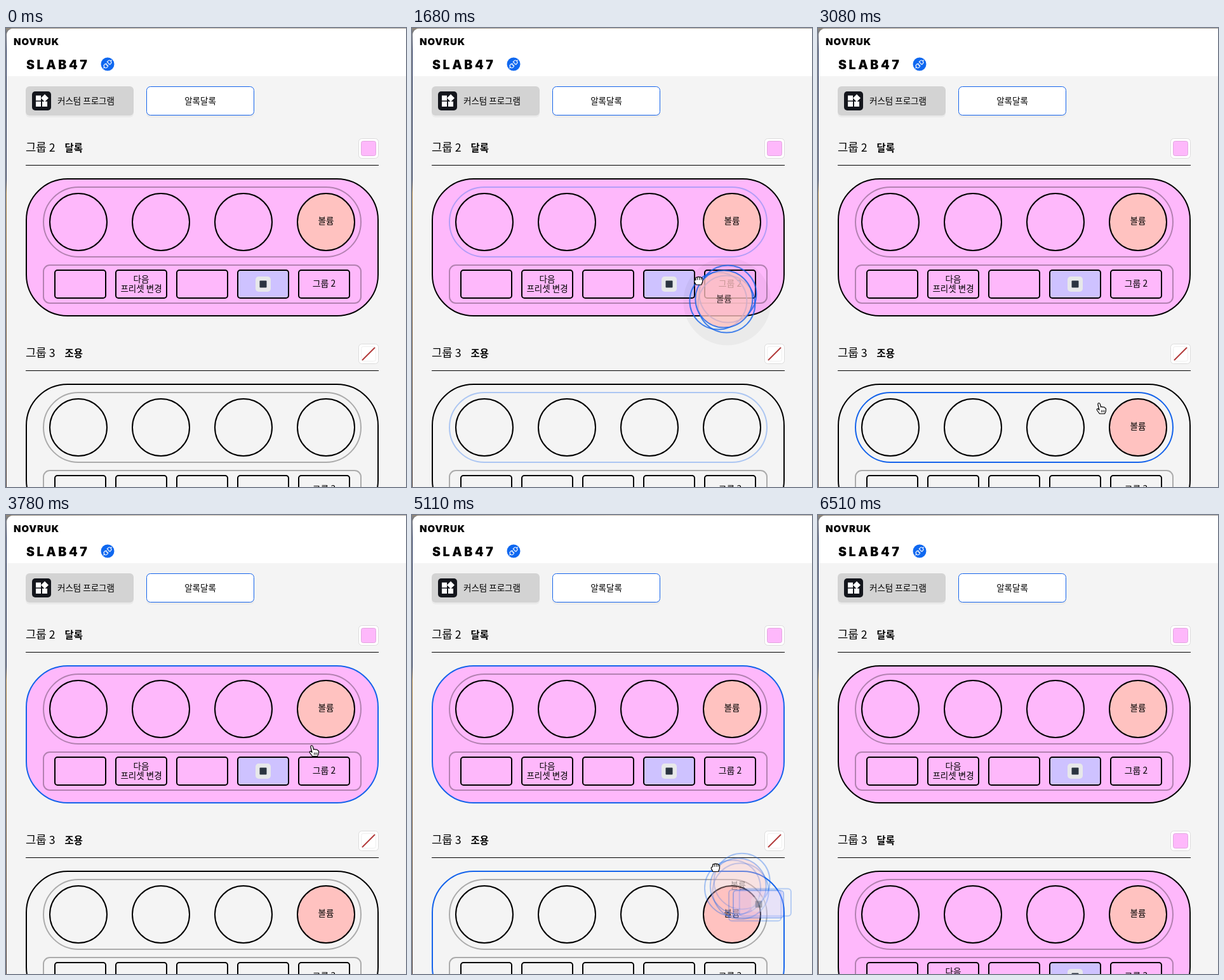
An HTML page with a canvas that plays this animation: 630x724 px, repeating every 6.86 s.

```html
<!DOCTYPE html>
<html lang="ko">
<head>
<meta charset="utf-8">
<style>
html, body { margin: 0; width: 100%; height: 100%; overflow: hidden; }
canvas { display: block; }
</style>
</head>
<body>
<canvas id="stage" width="630" height="724"></canvas>
<script>
const ctx = document.getElementById('stage').getContext('2d');
const LOOP = 6860, STEP = 70;
const BLUE = '#1463eb', PALE = 'rgba(20,99,235,.32)', GREY = 'rgba(0,0,0,.3)';
const PINK = '#feb8fb', PEACH = '#ffc2c0', LILAC = '#cec2ff', PAGE = '#f4f4f4';
const HANGUL = '"Noto Sans CJK KR", "Noto Sans CJK JP", "Noto Sans CJK SC", sans-serif';

// Keys: time, then any number of values
const CURSOR = [
  [70, 560, 740], [490, 500, 318], [770, 500, 318], [1050, 461, 338], [1400, 455, 342],
  [1470, 455, 342], [2100, 441, 560], [2170, 439, 564], [2590, 446, 600], [3080, 446, 600],
  [3640, 474, 372], [3710, 474, 372], [3780, 485, 372], [4130, 570, 372], [4690, 570, 372],
  [4900, 496, 527], [5320, 460, 585], [5600, 455, 592], [5740, 454, 594], [6230, 454, 594],
  [6510, 470, 745]
];
// Ghost keys: offset from cursor, scale, opacity
const KNOB_GHOST = [[1470, 40, 29, 1, 0], [1610, 40, 29, 1, .78], [2170, 40, 29, 1, .78], [2450, 40, 29, 1, 0]];
const GROUP_GHOST = [[4690, 36, 28, 1, 0], [4830, 36, 28, 1, .36], [4900, 36, 28, 1, .36],
  [5600, 35, 35, .9, .33], [5740, 35, 35, .88, 0]];
const TIP = [[350, 0], [490, .85], [1050, .85], [1260, 0]];

function at(keys, t) {
  if (t <= keys[0][0]) return keys[0].slice(1);
  for (let i = 1; i < keys.length; i++) {
    const a = keys[i - 1], b = keys[i];
    if (t > b[0]) continue;
    const u = (t - a[0]) / (b[0] - a[0]), e = u * u * (3 - 2 * u);
    return a.slice(1).map((v, k) => v + (b[k + 1] - v) * e);
  }
  return keys[keys.length - 1].slice(1);
}
const within = (t, a, b) => t >= a && t < b;

function paint(fill, stroke, width) {
  if (fill) { ctx.fillStyle = fill; ctx.fill(); }
  if (stroke) { ctx.strokeStyle = stroke; ctx.lineWidth = width; ctx.stroke(); }
}
function box(x, y, w, h, r, fill, stroke, width = 2) {
  ctx.beginPath();
  ctx.roundRect(x, y, w, h, r);
  paint(fill, stroke, width);
}
function disc(x, y, r, fill, stroke, width = 2) {
  ctx.beginPath();
  ctx.arc(x, y, r, 0, 7);
  paint(fill, stroke, width);
}
function path(d, fill, stroke, width) {
  const p = new Path2D(d);
  if (fill) { ctx.fillStyle = fill; ctx.fill(p); }
  if (stroke) { ctx.strokeStyle = stroke; ctx.lineWidth = width; ctx.stroke(p); }
}
// y is the vertical middle of the glyphs
function text(s, x, y, size, { weight = 400, align = 'center', color = '#000' } = {}) {
  ctx.font = `${weight} ${size}px ${HANGUL}`;
  ctx.textAlign = align;
  ctx.fillStyle = color;
  ctx.fillText(s, x, y + size * .37);
}
function wordmark(s, x, y, size, gap) {
  ctx.font = `900 ${size}px Inter, sans-serif`;
  ctx.textAlign = 'left';
  ctx.fillStyle = '#000';
  ctx.letterSpacing = gap + 'px';
  ctx.fillText(s, x, y);
  ctx.letterSpacing = '0px';
}
function placed(x, y, draw, scale = 1, angle = 0) {
  ctx.save();
  ctx.translate(x, y);
  ctx.rotate(angle);
  ctx.scale(scale, scale);
  draw();
  ctx.restore();
}

function desktop() {
  const side = ctx.createLinearGradient(0, 0, 0, 724);
  [[0, '#8d8a86'], [.05, '#27365c'], [.33, '#35405f'], [.36, '#b08a4c'], [.6, '#8a6c48'], [1, '#4b3d38']]
    .forEach(([p, c]) => side.addColorStop(p, c));
  ctx.fillStyle = side;
  ctx.fillRect(0, 0, 630, 724);
  const top = ctx.createLinearGradient(0, 0, 630, 0);
  top.addColorStop(0, '#8f8578');
  top.addColorStop(.5, '#c9beb0');
  top.addColorStop(1, '#a9a39c');
  ctx.fillStyle = top;
  ctx.fillRect(0, 0, 630, 2);
}

function header() {
  box(1, 1, 640, 740, 10, PAGE);
  box(1, 1, 640, 75, [10, 0, 0, 0], '#fff');
  wordmark('NOVRUK', 12, 27, 15, .9);
  wordmark('SLAB47', 32, 64.5, 19.5, 3.6);
  disc(160, 57, 10.5, '#0f68f0');
  placed(160, 57, () => {
    path('M-2-3h-2a3 3 0 0 0 0 6h2zM2-3h2a3 3 0 0 1 0 6h-2zM-7 0h-2.5M7 0h2.5M-2-1.5h2M-2 1.5h2', null, '#fff', 1.1);
  }, 1, -Math.PI / 4);

  box(31, 95, 170, 46, 6, 'rgba(0,0,0,.04)');
  box(31, 92, 170, 46, 6, '#d3d3d3');
  box(41, 100, 30, 30, 5, '#14161c');
  path('M47 106.5h8v8h-8zM47 116h8v8h-8zM57 116h8v8h-8zM61 104.5l6 6-6 6-6-6z', '#fff');
  text('커스텀 프로그램', 81, 115, 13.5, { align: 'left' });
  box(221, 95, 170, 46, 6, 'rgba(0,0,0,.04)');
  box(221.5, 92.5, 169, 45, 6, '#fff', BLUE, 1);
  text('알록달록', 306, 115, 13.5);
}

function stopIcon(x, y) {
  box(x - 12, y - 12, 24, 24, 5, '#e7e8ea');
  box(x - 5.5, y - 5.5, 11, 11, 1, '#2b3440');
}

function group(y, n, s) {
  ctx.save();
  ctx.translate(0, y);
  text('그룹 ' + n, 31, 188, 17.8, { align: 'left', weight: 300 });
  text(s.pinkTitle ? '달록' : '조용', 92.5, 189, 15.4, { align: 'left', weight: 700 });
  ctx.fillStyle = '#000';
  ctx.fillRect(31, 216, 556, 1);

  box(555.5, 174.5, 31, 31, 5, '#fff', '#dcdcdc', 1);
  box(559.5, 178.5, 23, 23, 3, s.pinkTitle ? PINK : '#fff', s.pinkTitle ? '#e2a6df' : '#eee', 1);
  if (!s.pinkTitle) path('M561 200L581 180', null, '#b23a3a', 2);

  box(32, 238, 554, 216, 65, s.pink && PINK, s.panel ? BLUE : '#000');
  box(59, 251, 500, 110, 55, null, s.row);
  box(59, 374, 500, 60, 10, null, GREY);
  for (let i = 0; i < 4; i++) disc(114 + 130 * i, 306, 45, i == 3 && s.volume && PEACH, '#000');
  if (s.volume) text('볼륨', 504, 304.5, 13.5);
  for (let i = 0; i < 5; i++) box(77 + 96 * i, 382, 80, 44, 4, i == 3 && s.pink && LILAC, '#000');
  if (s.pink) {
    text('다음', 213, 396, 13.5);
    text('프리셋 변경', 213, 411, 13.5);
    stopIcon(405, 404);
  }
  text('그룹 ' + n, 501, 403, 13.9);
  ctx.restore();
}

function tooltip(alpha) {
  if (!alpha) return;
  ctx.globalAlpha = alpha;
  box(449, 365, 110, 61, 3, '#949094');
  path('M499 366l6-6 6 6z', '#949094');
  [['시계', 387, 1], ['반시계', 404, -1]].forEach(([label, y, dir]) => {
    text(label, 485, y, 11, { align: 'left', weight: 700, color: '#fff' });
    ctx.save();
    ctx.translate(474, y);
    ctx.scale(dir, 1);
    path('M-3.5 3.5A5 5 0 1 1 4.6 1.5M2 1.5h3v-3', null, '#fff', 1.1);
    ctx.restore();
    path(`M527 ${y - 2}h3l4-4v11l-4-4h-3z`, '#444');
    path(`M535.5 ${y - 3}q2 2.500 0 5M537 ${y - 5}q3.500 4.500 0 9`, null, '#eee', 1);
  });
  ctx.globalAlpha = 1;
}

function knobStack(alpha) {
  ctx.globalAlpha = alpha;
  [[-9, 3], [6, -8], [4, 8]].forEach(([x, y]) => disc(x, y, 45, null, BLUE));
  disc(0, 0, 45, PEACH, BLUE);
  text('볼륨', 0, -1, 13.5);
}

function ghosts(t, cx, cy) {
  const [kx, ky, , ka] = at(KNOB_GHOST, t);
  if (ka) placed(cx + kx, cy + ky, () => {
    disc(5, 4, 69, `rgba(0,0,0,${.05 * ka})`);
    knobStack(ka);
  });
  const [gx, gy, scale, ga] = at(GROUP_GHOST, t);
  if (ga) placed(cx + gx, cy + gy, () => {
    knobStack(ga);
    ctx.globalAlpha = ga * .8;
    box(-15, 6, 84, 50, 5, null, BLUE);
    box(2, 4, 83, 44, 5, null, BLUE);
    ctx.globalAlpha = ga;
    box(-8, 7, 81, 44, 5, LILAC, BLUE);
    stopIcon(33, 29);
  }, scale);
  ctx.globalAlpha = 1;
}

function cursor(x, y, grabbing) {
  ctx.lineJoin = ctx.lineCap = 'round';
  placed(x, y, () => {
    if (grabbing) {
      path('M-4 6.500L-6.500 2Q-7.500-1-4.500-1V-4Q-4-6-2-5Q-1-7 1-5.500Q3-6.500 4-4.500Q6.500-5 6.500-2Q7 2 4.500 6.500Z', '#fff', '#000', 1.2);
      path('M-1.800-4.500V-1.500M1.200-5V-1.500M4-4V-1.500', null, '#000', 1);
    } else {
      path('M-2.500 8.500L-6.500 3Q-7.500.500-5 .500L-3 2.500L-5-5.500Q-5.500-8.500-3.500-8.500Q-2-8.500-1.500-6L-.500-2Q1-3.500 2.500-1.800Q4.500-3 5.500-1Q7.500-1 7.500 1.500Q8 5 5.500 8.500Z', '#fff', '#000', 1.2);
      path('M.500 3V6M2.700 3V6M4.900 3V6', null, '#000', .9);
    }
  });
  ctx.lineJoin = 'miter';
  ctx.lineCap = 'butt';
}

function draw(t) {
  const [cx, cy] = at(CURSOR, t);
  const knobDrag = within(t, 1470, 2380), groupDrag = within(t, 4690, 5950);
  const dropped = t >= 5950;
  desktop();
  header();
  group(0, 2, {
    pink: true, pinkTitle: true, volume: true,
    panel: within(t, 3220, 5950),
    row: knobDrag ? PALE : within(t, 840, 1470) ? BLUE : GREY
  });
  group(324, 3, {
    pink: t >= 5180, pinkTitle: dropped, volume: t >= 2380,
    panel: groupDrag,
    row: knobDrag ? PALE : within(t, 2380, 3150) || within(t, 6020, 6370) ? BLUE : GREY
  });
  tooltip(at(TIP, t)[0]);
  ghosts(t, cx, cy);
  if (within(t, 70, 6510)) cursor(cx, cy, knobDrag || groupDrag);
}

let start;
function tick(now) {
  start ??= now;
  const t = (now - start) % LOOP;
  draw(Math.floor(t / STEP) * STEP);
  requestAnimationFrame(tick);
}
draw(0);
requestAnimationFrame(tick);
</script>
</body>
</html>
```
